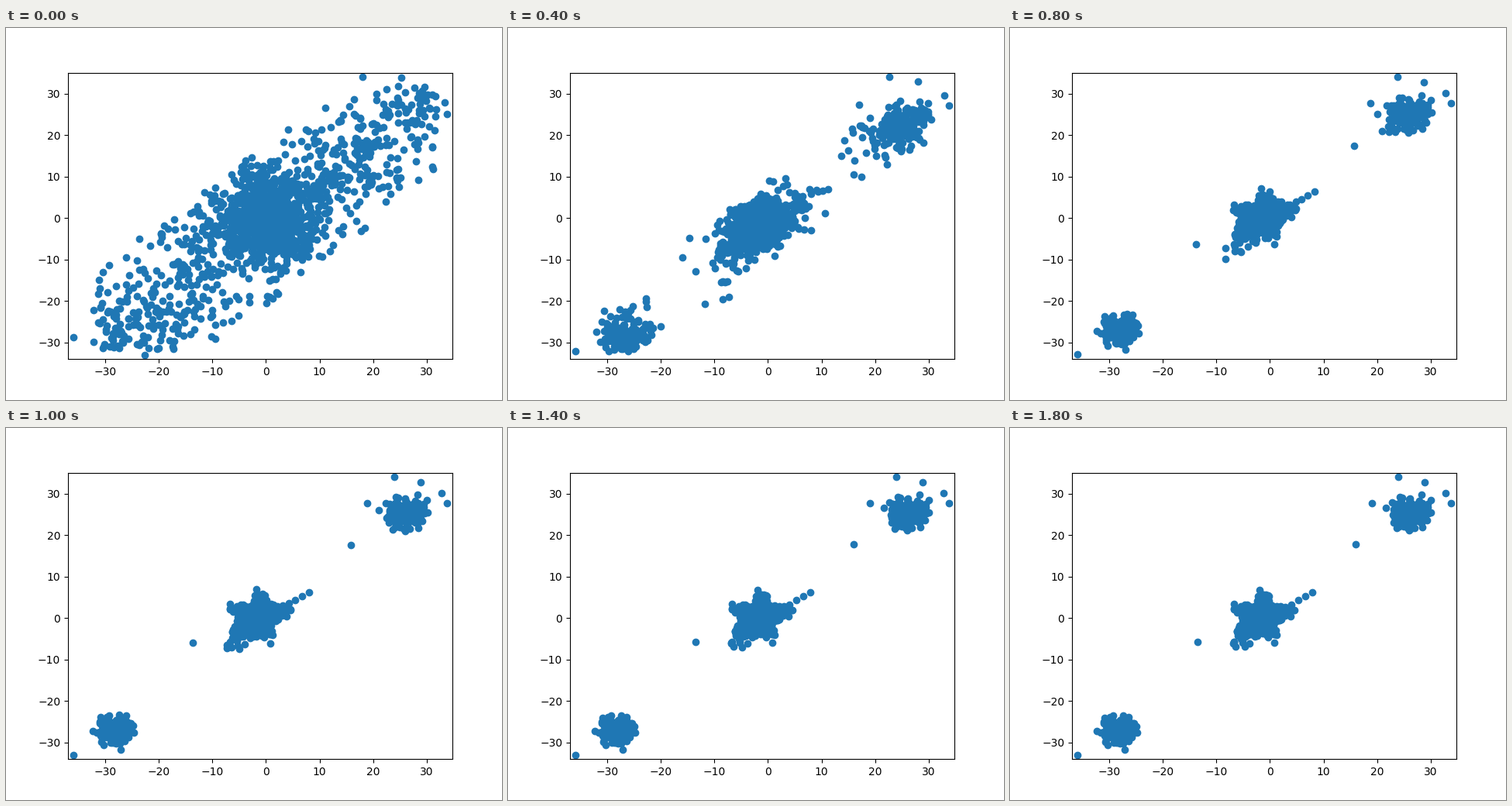
A matplotlib script that plays this animation: 640x480 px, repeating every 2000 ms.

```python
import matplotlib.pyplot as plt
import numpy as np
from matplotlib.animation import FuncAnimation

FRAMES = 10
MIDDLE = np.array([335, 245])
CENTRES = np.array([(140, 390), (324, 245), (515, 108)])  # stage pixels
BORDERS = np.array([-150, 105])  # basin limits along the diagonal
rng = np.random.default_rng(11)


def along(px):
    """Position on the rising diagonal through the middle."""
    return (px - MIDDLE) @ [0.8, -0.6]


def across(px):
    return (px - MIDDLE) @ [0.6, 0.8]


def scatter_start():
    """Round core plus a diagonal band, cut to the plot."""
    core = rng.normal((338, 245), (32, 27), (750, 2))
    t = rng.uniform(-290, 275, (800, 1))
    s = rng.normal(4, 42, (800, 1))
    band = MIDDLE + t * [0.8, -0.6] + s * [0.6, 0.8]
    px = np.concatenate([core, band])
    x, y, side = px[:, 0], px[:, 1], across(px)
    fits = (x > 112) & (x < 556) & (y > 70) & (y < 416)
    return px[fits & (side > -78) & (side < 90)]


def disc(n, sx, sy):
    """Round cloud with a firm edge at two spreads."""
    angle = rng.uniform(0, 2 * np.pi, n)
    radius = 2 * rng.random(n) ** 0.6
    return np.column_stack([sx * radius * np.cos(angle),
                            sy * radius * np.sin(angle)])


def star(shape):
    """Pull a cloud out into five arms."""
    angle = np.arctan2(shape[:, 1], shape[:, 0])
    reach = 1 + 0.35 * np.cos(5 * (angle - np.radians(62)))
    return shape * reach[:, None]


def resting_places(start):
    """Each point ends near its basin's centre, keeping a little offset."""
    basin = np.digitize(along(start), BORDERS)
    end = np.empty_like(start)
    for k, centre in enumerate(CENTRES):
        own = basin == k
        offset = start[own] - start[own].mean(axis=0)
        shape = 0.17 * offset + disc(own.sum(), 10, 7.5)
        end[own] = centre + (star(shape) if k == 1 else shape)
    return end


def pull(start):
    """Points close to a basin border set off more slowly."""
    gap = np.abs(along(start)[:, None] - BORDERS).min(axis=1)
    return 0.425 * np.sqrt(np.clip(gap / 60, 0.005, 1))


cloud = scatter_start()
# The outermost points and two lone ones: start x, y and end x, y.
key = np.array([
    (87, 399, 87, 422), (179, 422, 148, 415), (190, 336, 242, 276),
    (388, 205, 446, 150), (412, 103, 467, 97), (460, 63, 501, 63),
    (510, 64, 535, 70), (566, 96, 562, 84), (569, 111, 569, 97),
])
chain_start = np.linspace((419, 188), (468, 198), 5)
chain_end = np.linspace((354, 233), (390, 212), 5)

start = np.concatenate([cloud, key[:, :2], chain_start])
end = np.concatenate([resting_places(cloud), key[:, 2:], chain_end])
rate = pull(start)
in_cloud = np.arange(len(start)) < len(cloud)


def offsets(frame):
    left = 1 / (1 + rate * np.expm1(1.1 * frame))
    px = end + (start - end) * left[:, None]
    # The clouds sag a little while they contract.
    px[:, 1] += in_cloud * 8 * np.exp(-(frame - 2) ** 2 / 1.5)
    y = np.clip(px[:, 1], 63, 422)
    return np.column_stack([(px[:, 0] - 335.4) / 6.917, (245.3 - y) / 5.347])


fig, ax = plt.subplots(figsize=(6.4, 4.8), dpi=100)
dots = ax.scatter(*offsets(0).T, color="#1f77b4")
ax.set_xlim(-36.925, 34.785)
ax.set_ylim(-34.02, 35.1)
ax.set_xticks(range(-30, 31, 10))
ax.set_yticks(range(-30, 31, 10))


def update(frame):
    dots.set_offsets(offsets(frame))
    return (dots,)


anim = FuncAnimation(fig, update, frames=FRAMES, interval=200, repeat=True,
                     repeat_delay=0, init_func=lambda: update(0))
plt.show()
```
